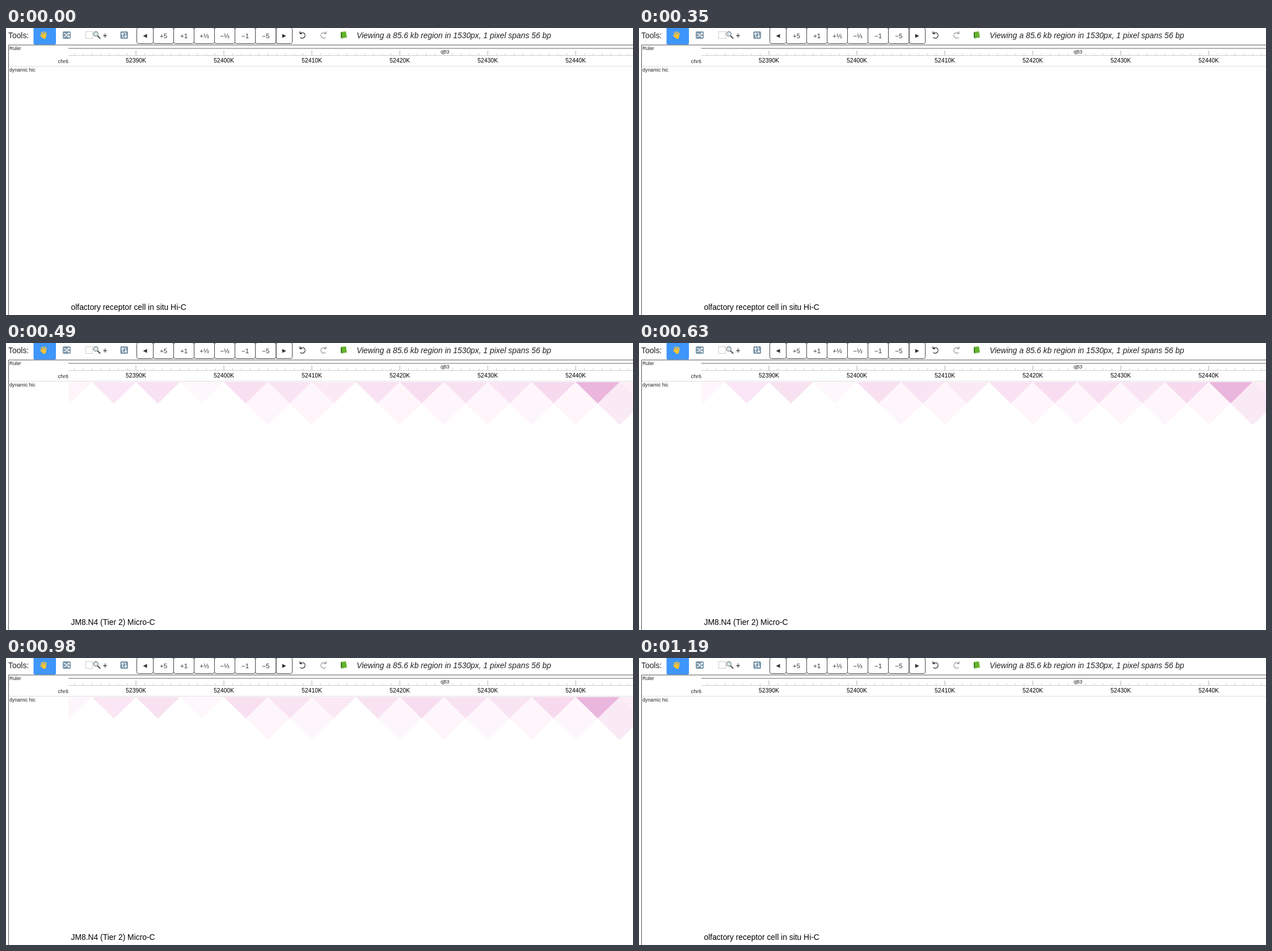
An HTML page for the animation above (1.26 s loop, 1105 by 507 pixels).

```html
<!DOCTYPE html>
<html lang="en">
<head>
<meta charset="utf-8">
<title>Dynamic Hi-C track</title>
<style>
html, body { margin: 0; width: 100%; height: 100%; overflow: hidden; background: #fff; }
svg { display: block; font: 13.87px "Liberation Sans", Arial, sans-serif; }
.small { font-size: 8.67px; fill: #222; }
.label { font-size: 10.4px; text-anchor: middle; }
.button { font-size: 11.5px; fill: #333; text-anchor: middle; }
.line { fill: none; stroke-linecap: round; stroke-linejoin: round; }
</style>
</head>
<body>
<svg width="1105" height="507" viewBox="0 0 1105 507">
  <defs><clipPath id="view"><path d="M110 69H1105V507H110Z"/></clipPath></defs>

  <!-- Toolbar -->
  <text x="4" y="17.5" fill="#222">Tools:</text>
  <path d="M48.500 0H88V26.500Q88 29.500 85 29.500H51.500Q48.500 29.500 48.500 26.500Z" fill="#3f96fb"/>
  <g class="line" stroke="#fcc52f" stroke-width="1.800">
    <path d="M63.700 13L62.300 8.500M65.600 12L65.100 6.800M67.800 12L68.200 7M69.800 13L71 8.800M63.800 16L60.800 12.800"/>
    <path d="M63.500 13H70L69 18H65.500Z" fill="#fcc52f"/>
  </g>
  <g fill="#7894a8">
    <rect x="100" y="6" width="14" height="13" rx="2"/>
    <rect x="201.500" y="6" width="13.500" height="13" rx="2"/>
  </g>
  <g class="line" stroke="#fff" stroke-width="1.300">
    <path d="M102 9.800H104.500L109 15.200H112M102 15.200H104.500L109 9.800H112M110.500 8.200L112 9.800L110.500 11.400M110.500 13.600L112 15.200L110.500 16.800"/>
    <path d="M205.500 9V14.500Q205.500 16.800 207.500 16.500M203.800 10.500L205.500 8.500L207.200 10.500M211 16V10.500Q211 8.200 209 8.500M209.300 14.500L211 16.500L212.700 14.500"/>
  </g>
  <rect x="140.500" y="6.500" width="12" height="12" fill="none" stroke="#ccc"/>
  <path class="line" d="M161.500 14L165.500 18" stroke="#555" stroke-width="2.200"/>
  <circle cx="158.300" cy="10.500" r="4" fill="#d5e8f0" stroke="#888" stroke-width="1.300"/>
  <text x="170.500" y="18" fill="#222">+</text>
  <g id="buttons"></g>
  <g class="line" stroke-width="1.300">
    <path d="M518.500 9.500A5 5 0 1 1 519 17M518 6.500V10H521.700" stroke="#333"/>
    <path d="M563.500 9.500A5 5 0 1 0 563 17M564 6.500V10H560.300" stroke="#999"/>
  </g>
  <path d="M590 7L599 6L601 17L592 18.800L590 16.500Z" fill="#65b32e"/>
  <path d="M590 7L592 9V18.800L590 16.500Z" fill="#39751d"/>
  <path d="M592 18.500L601 16.800" stroke="#ddd"/>
  <text x="618" y="17.500" font-style="italic" fill="#222">Viewing a 85.6 kb region in 1530px, 1 pixel spans 56 bp</text>

  <!-- Ruler -->
  <path d="M1105 30H4.500V507" fill="none" stroke="#555"/>
  <path d="M110 36H1105" stroke="#b5b0b5" stroke-width="1.800"/>
  <path d="M110 48.500H1105" stroke="#ccc"/>
  <path d="M5 67.500H1105" stroke="#ddd"/>
  <g id="ticks"></g>
  <text class="small" x="6" y="39">Ruler</text>
  <text class="small" x="6" y="76.500">dynamic hic</text>
  <text x="91.500" y="61.500" font-size="9.530" fill="#222">chr6</text>
  <text class="small" x="766" y="45">qB3</text>

  <!-- Contact map -->
  <g id="map" clip-path="url(#view)"></g>
  <text id="sample" x="114.500" y="497.500"></text>
</svg>
<script>
const byId = id => document.getElementById(id);
const add = (id, markup) => byId(id).insertAdjacentHTML("beforeend", markup);

const edges = [230.5, 259.5, 295.5, 331.5, 367.5, 403.5, 439.5, 476, 504.5];
["◀", "+5", "+1", "+⅓", "−⅓", "−1", "−5", "▶"].forEach((name, i) => {
  const x = edges[i], width = edges[i + 1] - x, mid = x + width / 2;
  add("buttons", `<rect x="${x}" y="-.5" width="${width}" height="28" rx="3" fill="none" stroke="#444"/>`);
  const side = name === "◀" ? -1 : name === "▶" ? 1 : 0;
  add("buttons", side
    ? `<path d="M${mid + 3.5 * side} 14L${mid - 3.5 * side} 10.5V17.500Z" fill="#333"/>`
    : `<text class="button" x="${mid}" y="17.500">${name}</text>`);
});

// One tick per 1K bases, a label per 10K
for (let k = 52383; k <= 52446; k++) {
  const x = 229 + (k - 52390) * 15.5, major = k % 10 === 0;
  add("ticks", `<path d="M${x} ${major ? 40 : 44.5}V48" stroke="${major ? "#aaa" : "#ccc"}"/>`);
  if (major) add("ticks", `<text class="label" x="${x}" y="61">${k}K</text>`);
}

// Neighbouring 5K bins: triangles on the diagonal, diamonds below
const bin = 77.5, half = bin / 2, mapTop = 69, depth = 38;
const near = ["fef6fb", "fae6f4", "f8e2f2", "fef7fb", "f8e0f1", "f9e4f3", "fbeaf5",
  "f9e3f2", "f8ddf0", "f8e2f2", "f9e4f3", "f7daee", "ebb6dd", "fcedf7"];
const pale = "fef6fb";
const far = { 5: pale, 6: pale, 8: pale, 9: pale, 10: pale, 11: pale, 12: pale, 13: "faeaf5" };
near.forEach((color, i) => {
  const x = 74 + i * bin;
  add("map", `<path d="M${x} ${mapTop}h${bin}l${-half} ${depth}Z" fill="#${color}"/>`);
  if (far[i]) add("map",
    `<path d="M${x} ${mapTop}l${half} ${depth}l${-half} ${depth}l${-half} ${-depth}Z" fill="#${far[i]}"/>`);
});

const loop = 1260, mapStart = 420, mapEnd = 1050;
function draw() {
  const t = performance.now() % loop;
  const shown = t >= mapStart && t < mapEnd;
  byId("map").style.display = shown ? "" : "none";
  byId("sample").textContent = shown ? "JM8.N4 (Tier 2) Micro-C" : "olfactory receptor cell in situ Hi-C";
  requestAnimationFrame(draw);
}
draw();
</script>
</body>
</html>
```
